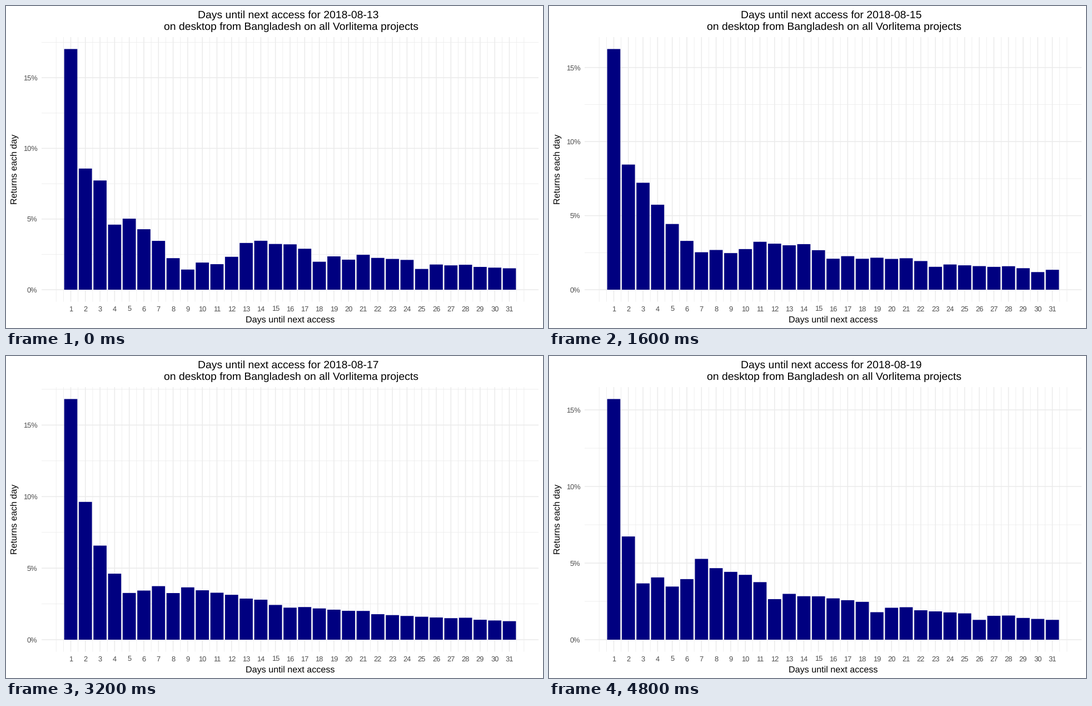
Animation, 966 px wide and 580 px high, one loop 5.6 s. Source, as a matplotlib script:

```python
import numpy as np
import matplotlib.pyplot as plt
from matplotlib.animation import FuncAnimation
from matplotlib.collections import LineCollection
from matplotlib.patches import Rectangle

plt.rcParams["font.family"] = "Liberation Sans"
plt.rcParams["text.hinting"] = "none"

W, H, DPI = 966, 580, 100
PT = 72 / DPI  # points per pixel
LEFT, RIGHT, TOP, BOTTOM = 64, 958, 56, 532.6
BASE, TALLEST = 511, 433.5
STEP = 26.3
GRID, NAVY, GREY = "#EBEBEB", "#000080", "#4D4D4D"
TITLE, LABEL, TICK = 19.35, 16.13, 12.9
MAJOR, MINOR = 1.57, 0.78

FRIDAY = 4  # days from the first Monday
days = np.arange(1, 32)

# Per start day: share back the next day, and how strongly activity shows
peaks = [17.03, 14.60, 16.25, 14.00, 16.82, 15.90, 15.71]
contrasts = [1.25, 1.25, 0.72, 1.15, 0.62, 0.85, 1.05]

# Activity by calendar day: a holiday dip, a rebound, then a slow decline
activity = [(2, 0.92), (3, 1.08), (6, 1.02), (7, 0.90), (9, 0.54), (11, 0.92),
            (12, 0.95), (13, 1.32), (16, 1.46), (20, 1.20), (21, 1.33),
            (24, 1.33), (26, 1.22), (31, 1.19), (37, 1.06)]


def returns(start):
    """Percent of visitors coming back after each number of days."""
    date = days + start
    same_weekday = days % 7 == 0
    level = np.interp(date, *zip(*activity))
    level[(date % 7 == FRIDAY) & ~same_weekday] *= 0.8
    shares = 16 * days ** -0.75 * level ** contrasts[start]
    shares[same_weekday] *= 1.06
    shares[0] = peaks[start]
    return shares


fig = plt.figure(figsize=(W / DPI, H / DPI), dpi=DPI, facecolor="white")
ax = fig.add_axes([0, 0, 1, 1])
ax.set_xlim(0, W)
ax.set_ylim(H, 0)
ax.axis("off")


def day_x(day):
    return 116.5 + STEP * (day - 1)


def write(x, y, text, size, color="black", ha="center", **kw):
    return ax.text(x, y, text, fontsize=size * PT, color=color, ha=ha,
                   va="baseline", **kw)


def grid(width, segments=()):
    lines = LineCollection(segments, colors=GRID, linewidths=width * PT,
                           capstyle="butt", zorder=1)
    lines.set_snap(False)
    return ax.add_collection(lines, autolim=False)


def columns(positions):
    return [[(day_x(d), TOP), (day_x(d), BOTTOM)] for d in positions]


def rows(heights):
    return [[(LEFT, y), (RIGHT, y)] for y in heights if y >= TOP]


grid(MINOR, columns([0, 32] + [d + 0.5 for d in range(32)]))
grid(MAJOR, columns(days))
minor_rows, major_rows = grid(MINOR), grid(MAJOR)

bars = []
for d in days:
    bar = Rectangle((day_x(d) - 0.45 * STEP, BASE), 0.9 * STEP, 0,
                    facecolor=NAVY, linewidth=0, zorder=2, snap=False)
    bars.append(ax.add_patch(bar))
    write(day_x(d), 549.6, str(d), TICK, GREY)

heading = write(344.7, 22.3, "", TITLE, ha="left")
write(283.5, 43, "on desktop from Bangladesh on all Vorlitema projects", TITLE,
      ha="left")
write(511, 569.3, "Days until next access", LABEL)
write(19.6, 294, "Returns each day", LABEL, rotation=90, rotation_mode="anchor")
ticks = [write(56.5, 0, f"{p}%", TICK, GREY, ha="right") for p in (0, 5, 10, 15)]


def update(i):
    shares = returns(i)
    scale = TALLEST / shares[0]
    major = BASE - scale * 5 * np.arange(4)

    heading.set_text(f"Days until next access for 2018-08-{13 + i}")
    major_rows.set_segments(rows(major))
    minor_rows.set_segments(rows(major - 2.5 * scale))
    for bar, share in zip(bars, shares):
        bar.set_height(-share * scale)
    for tick, y in zip(ticks, major):
        tick.set_y(y + 4.6)
        tick.set_visible(y >= TOP)
    return [heading, major_rows, minor_rows, *bars, *ticks]


anim = FuncAnimation(fig, update, frames=len(peaks), interval=800, repeat=True,
                     repeat_delay=0, blit=False)
plt.show()
```
